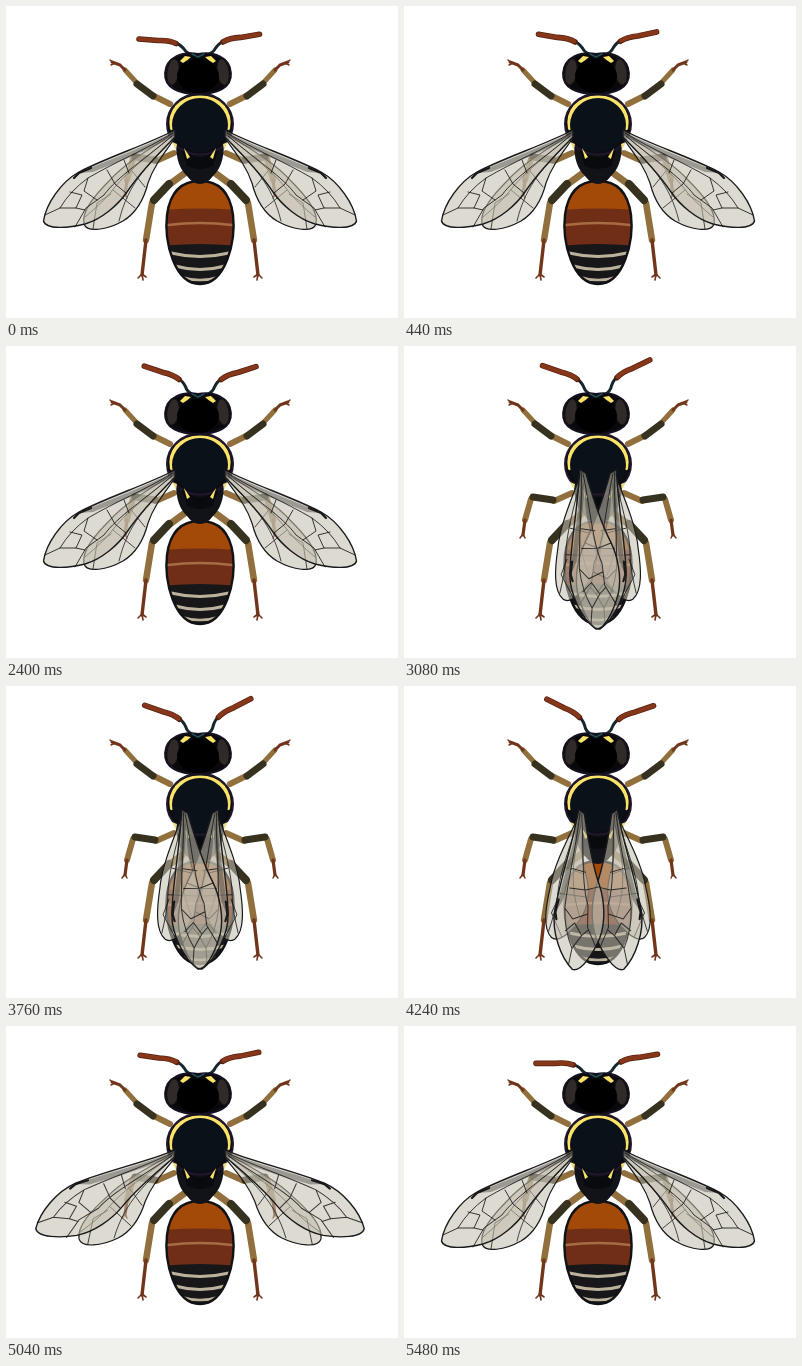
These frames come from a looping animation (392 px wide and 312 px high, 5.52 s). An HTML page with a canvas:

```html
<!DOCTYPE html>
<html>
<head>
<meta charset="utf-8">
<style>
html, body { margin: 0; width: 100%; height: 100%; overflow: hidden; background: #fff; }
canvas { display: block; }
</style>
</head>
<body>
<canvas id="stage" width="392" height="312"></canvas>
<script>
const ctx = document.getElementById('stage').getContext('2d');
const LOOP = 5520, STEP = 40, AXIS = 388;
const INK = '#111216', TAN = '#91703d', DARK = '#37321f', FOOT = '#70351a', YELLOW = '#fbe36a';

// [time, degrees raised]
const wingKeys = [[0, 0], [100, 0], [240, 4.7], [400, 0], [1160, 0], [1300, 25], [1480, 0],
  [2420, 0], [2800, -61], [4060, -61], [4900, 12], [5160, 0], [LOOP, 0]];
const leftKeys = [[0, 0], [440, 5], [1440, 4], [2400, 14], [3760, 15], [4640, 28],
  [5020, 4], [5480, -4.5], [LOOP, 0]];
const rightKeys = [[0, 5], [440, 7.5], [1440, 12], [2400, 13.5], [3500, 25], [3760, 23],
  [4600, 9], [LOOP, 5]];

function valueAt(keys, t) {
  let i = 1;
  while (i < keys.length - 1 && keys[i][0] < t) i++;
  const [t0, a] = keys[i - 1], [t1, b] = keys[i];
  const u = (t - t0) / (t1 - t0);
  return a + (b - a) * (1 - Math.cos(Math.PI * u)) / 2;
}

function mirror(draw) {
  ctx.save();
  ctx.translate(AXIS, 0);
  ctx.scale(-1, 1);
  draw();
  ctx.restore();
}

function both(draw) { draw(); mirror(draw); }

function turn(x, y, deg, draw) {
  ctx.save();
  ctx.translate(x, y);
  ctx.rotate(deg * Math.PI / 180);
  ctx.translate(-x, -y);
  draw();
  ctx.restore();
}

function shape(d, fill, stroke, width) {
  const p = new Path2D(d);
  if (fill) { ctx.fillStyle = fill; ctx.fill(p); }
  if (stroke) { ctx.strokeStyle = stroke; ctx.lineWidth = width; ctx.stroke(p); }
}

function oval(x, y, rx, ry, fill, stroke, width) {
  ctx.beginPath();
  ctx.ellipse(x, y, rx, ry, 0, 0, 2 * Math.PI);
  if (fill) { ctx.fillStyle = fill; ctx.fill(); }
  if (stroke) { ctx.strokeStyle = stroke; ctx.lineWidth = width; ctx.stroke(); }
}

function legs() {
  // front
  shape('M164 98L146 89', null, TAN, 6);
  shape('M130 76L119 64', null, TAN, 5);
  shape('M147 90L131 78', null, DARK, 7);
  shape('M119 64L114 59L106 56', null, FOOT, 3);
  shape('M108 57L104 54M109 57L105 59', null, FOOT, 1.5);
  // middle
  shape('M168 147L150 155', null, TAN, 6);
  shape('M127 153L121 174', null, TAN, 6);
  shape('M149 154L129 151', null, DARK, 7);
  shape('M121 174L119 189', null, FOOT, 3.2);
  shape('M119 188L116 192M119 188L121 192', null, FOOT, 1.5);
  // hind
  shape('M183 164L164 178', null, TAN, 7);
  shape('M146 197L140 234', null, TAN, 6.5);
  shape('M163 178L148 194', null, DARK, 8);
  shape('M140 234L136 269', null, FOOT, 3.4);
  shape('M136 268L132 272M136 268L137 274M136 268L140 271', null, FOOT, 1.6);
}

function abdomen() {
  const d = 'M194 175C213 175 224 186 227 209C230 235 220 278 194 278C168 278 158 235 161 209C164 186 175 175 194 175Z';
  ctx.save();
  ctx.clip(new Path2D(d));
  shape('M155 170H233V205H155Z', '#a34a09');
  shape('M155 204Q194 201 233 204V242H155Z', '#702e16');
  shape('M162 219Q194 215 226 219', null, '#a66c43', 2.6);
  shape('M155 240Q194 236 233 240V282H155Z', '#17171a');
  shape('M165 247Q194 254 223 247', null, '#bcb19b', 3.2);
  shape('M169 260Q194 267 219 260', null, '#bcb19b', 3);
  shape('M175 271Q194 277 213 271', null, '#bcb19b', 2.6);
  ctx.restore();
  shape(d, null, INK, 2.4);
}

function thorax() {
  shape('M170 138H218Q218 160 207 170Q201 178 194 178Q187 178 181 170Q170 160 170 138Z', '#121319');
  oval(194, 118, 33, 30.5, '#0b0d11', '#21172d', 2);
  shape('M166 122C163 106 174 91.5 194 91.5C214 91.5 225 106 222 122', null, YELLOW, 4.2);
  oval(194, 119, 28, 27, '#0b1118');
  shape('M176 144Q194 158 212 144L207 160Q194 166 181 160Z', '#080a0e');
  both(() => {
    shape('M178 142L184 151L181 153Z', YELLOW);
    shape('M166 136L171 138L170 144Z', '#eedc82');
  });
}

function antenna(deg) {
  turn(188, 48, deg, () => {
    shape('M188 49Q181 48 178 43Q174 38 168 36.5', null, '#17262d', 3);
    shape('M170 37.5Q163 34 152 34.5L133 33', null, '#54200f', 5.6);
    shape('M169 37Q163 34 152 34.5L133 33', null, '#873719', 4.2);
  });
}

function head() {
  shape('M192 48C207 45 224 51 225 67C226 82 211 88 192 88C173 88 158 82 159 67C160 51 177 45 192 48Z',
    '#09090b', '#171022', 1.8);
  turn(167, 66, 8, () => oval(167, 66, 6, 13, '#302b29', '#171414', 1));
  turn(217, 66, -8, () => oval(217, 66, 6, 13, '#302b29', '#171414', 1));
  oval(192, 70, 21, 17, '#000');
  shape('M174 55L179 50L185 51Q182 54 177 57Z', YELLOW);
  shape('M210 55L205 50L199 51Q202 54 207 57Z', YELLOW);
  shape('M186 48L192 51L198 48', null, '#21515a', 1.4);
}

const MEMBRANE = 'rgba(194,190,173,.56)', EDGE = '#18191b', VEIN = 'rgba(24,24,25,.85)';

function wing(deg, hinge, draw) {
  ctx.save();
  ctx.translate(8 * Math.max(0, -deg) / 61, 0);
  turn(168, 125, deg * hinge, draw);
  ctx.restore();
}

function hindWing() {
  shape('M167 128C145 142 119 157 104 174C90 188 75 205 78 218C81 227 101 224 117 215C132 206 139 189 142 177C148 159 160 145 169 132Z',
    MEMBRANE, EDGE, 1.2);
  shape('M166 130C141 151 118 168 105 186Q96 197 79 211M163 137C143 158 122 177 113 215M107 184L129 202M126 165L139 181M105 188L91 197L87 223',
    null, VEIN, .9);
}

function foreWing() {
  shape('M169 124C140 139 102 151 73 166C55 176 40 198 37.5 215C40 224 63 222 79 218C96 213 112 199 121 186C133 168 151 149 169 131Z',
    MEMBRANE, EDGE, 1.4);
  shape('M169 125C140 141 108 151 73 167L87 166C112 156 146 143 168 130Z', 'rgba(38,37,34,.36)');
  shape('M167 127C137 145 111 155 82 172Q64 185 54 202L39 209M166 130C139 153 111 171 98 189L80 202L69 221M82 172L78 185L91 194M64 186L76 189L70 202L54 202M101 164L109 178L120 187M118 154L123 167M70 202L79 204',
    null, VEIN, 1);
  shape('M85 162L73 167L68 172', null, EDGE, 2.2);
}

function draw(t) {
  ctx.fillStyle = '#fff';
  ctx.fillRect(0, 0, 392, 312);
  ctx.lineJoin = 'round';
  ctx.lineCap = 'round';
  const spread = valueAt(wingKeys, t);
  both(legs);
  abdomen();
  thorax();
  antenna(valueAt(leftKeys, t));
  mirror(() => antenna(valueAt(rightKeys, t)));
  head();
  both(() => wing(spread, .6, hindWing));
  mirror(() => wing(spread, 1, foreWing));
  wing(spread, 1, foreWing);
}

const start = performance.now();
function tick() {
  const t = (performance.now() - start) % LOOP;
  draw(Math.floor(t / STEP) * STEP);
  requestAnimationFrame(tick);
}
tick();
</script>
</body>
</html>
```
